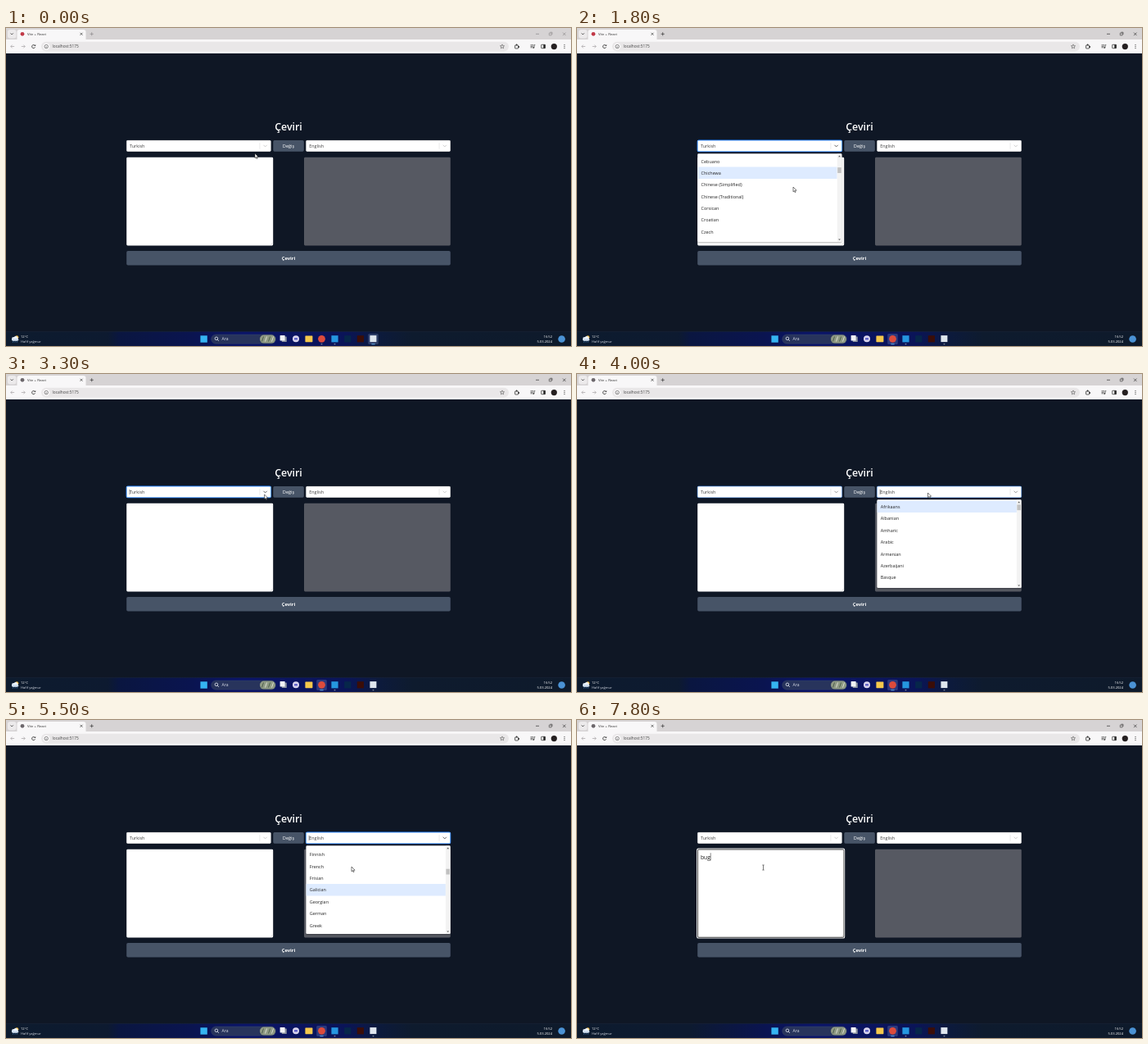
Animation of 690x388 px, one loop 8 s. Source, as an HTML page with a canvas:

```html
<!DOCTYPE html>
<html lang="tr">
<head>
<meta charset="utf-8">
<title>Çeviri</title>
<style>
html, body { margin: 0; width: 100%; height: 100%; overflow: hidden; background: #0f1725; }
canvas { display: block; width: 100vw; height: 100vh; }
</style>
</head>
<body>
<canvas id="stage"></canvas>
<script>
const W = 690, H = 388, LOOP = 8000, STEP = 100;
const FONT = '"Open Sans", "Noto Sans", sans-serif';
const ROW = 14.37, MENU_TOP = 153.3, MENU_H = 107.8, LIST_TOP = MENU_TOP + 1.44;
const LANGS = ('Afrikaans,Albanian,Amharic,Arabic,Armenian,Azerbaijani,Basque,Belarusian,Bengali,' +
  'Bosnian,Bulgarian,Catalan,Cebuano,Chichewa,Chinese (Simplified),Chinese (Traditional),' +
  'Corsican,Croatian,Czech,Danish,Dutch,English,Esperanto,Estonian,Filipino,Finnish,French,' +
  'Frisian,Galician,Georgian,German,Greek,Gujarati,Haitian Creole,Hausa,Hawaiian,Hebrew,Hindi,' +
  'Hmong,Hungarian,Icelandic,Igbo,Indonesian,Irish,Italian,Japanese').split(',');
const LANG_COUNT = 107;

// [time, x, y]
const POINTER = [
  [100, 304, 153], [300, 330, 126], [400, 338, 120], [700, 318, 141], [900, 300, 146],
  [1000, 300, 146], [1300, 270, 188], [1800, 264, 194], [2500, 276, 200], [2600, 282.5, 187],
  [3000, 315, 150], [3500, 316, 145], [3800, 428, 145], [4000, 428.5, 145], [4300, 424, 200],
  [4700, 422, 212], [5400, 422, 205], [5500, 422, 179], [5700, 424, 150], [6000, 420, 146],
  [6500, 227.5, 180]
];
const LEFT = {
  x: 147.2, value: 'Turkish', focus: 1000, blur: 4000, open: 1000, close: 3200,
  scroll: [[1300, 0], [1700, 155], [1800, 172], [2400, 503]]
};
const RIGHT = {
  x: 366.4, value: 'English', focus: 4000, blur: 6700, open: 4000, close: 6000,
  scroll: [[4250, 0], [4600, 252], [4700, 265], [5300, 357]]
};
const SELECT_W = 176.3;

const canvas = document.getElementById('stage');
const c = canvas.getContext('2d');

const clamp = v => Math.max(0, Math.min(1, v));

function track(keys, t, n = 1) {
  if (t <= keys[0][0]) return keys[0][n];
  for (let i = 1; i < keys.length; i++) {
    const a = keys[i - 1], b = keys[i];
    if (t <= b[0]) return a[n] + (b[n] - a[n]) * (t - a[0]) / (b[0] - a[0]);
  }
  return keys[keys.length - 1][n];
}

function mix(a, b, k) {
  return `rgb(${a.map((v, i) => Math.round(v + (b[i] - v) * k))})`;
}

function rect(x, y, w, h, fill, r = 0) {
  c.fillStyle = fill;
  c.beginPath();
  c.roundRect(x, y, w, h, r);
  c.fill();
}

function frame(x, y, w, h, stroke, lw, r = 0) {
  c.strokeStyle = stroke;
  c.lineWidth = lw;
  c.beginPath();
  c.roundRect(x, y, w, h, r);
  c.stroke();
}

function disc(x, y, r, fill) {
  c.fillStyle = fill;
  c.beginPath();
  c.arc(x, y, r, 0, 7);
  c.fill();
}

function line(stroke, lw, ...p) {
  c.strokeStyle = stroke;
  c.lineWidth = lw;
  c.beginPath();
  for (let i = 0; i < p.length; i += 2) c.lineTo(p[i], p[i + 1]);
  c.stroke();
}

function poly(fill, ...p) {
  c.fillStyle = fill;
  c.beginPath();
  for (let i = 0; i < p.length; i += 2) c.lineTo(p[i], p[i + 1]);
  c.closePath();
  c.fill();
}

function text(s, x, y, size, fill, align = 'left', weight = 400) {
  c.font = `${weight} ${size}px ${FONT}`;
  c.textAlign = align;
  c.fillStyle = fill;
  c.fillText(s, x, y);
}

function star(x, y, r) {
  const p = [];
  for (let i = 0; i <= 10; i++) {
    const a = i * Math.PI / 5 - Math.PI / 2, d = i % 2 ? r * 0.45 : r;
    p.push(x + d * Math.cos(a), y + d * Math.sin(a));
  }
  line('#555', 0.6, ...p);
}

function drawTabs(t) {
  const ink = t >= 900 ? '#333' : '#8a8788';
  rect(0, 0, W, 16, '#d6d3d4');
  rect(2, 2, 10.5, 10.5, '#eceaeb', 3);
  line('#333', 0.8, 5.6, 6.4, 7.2, 8, 8.8, 6.4);
  rect(13.5, 2, 84, 14, '#f8f7f8', [3, 3, 0, 0]);
  disc(20, 7.3, 2.4, t < 2700 ? '#c23a48' : '#6d686c');
  text('Vite + React', 26, 9.1, 4.25, '#333');
  line('#333', 0.7, 90.5, 5.8, 93.5, 8.8);
  line('#333', 0.7, 93.5, 5.8, 90.5, 8.8);
  line(ink, 0.7, 102.6, 7.3, 106.8, 7.3);
  line(ink, 0.7, 104.7, 5.2, 104.7, 9.4);
  line(ink, 0.7, 647, 7.3, 651, 7.3);
  frame(663.3, 6.1, 2.8, 2.8, ink, 0.6);
  line(ink, 0.6, 664.4, 5.2, 667, 5.2, 667, 7.9);
  line(ink, 0.7, 680, 5.6, 683.5, 9.1);
  line(ink, 0.7, 683.5, 5.6, 680, 9.1);
}

function drawToolbar() {
  rect(0, 14, W, 17, '#f8f7f8');
  for (const [x, d] of [[8, -1], [21, 1]]) {
    line('#a5a3a4', 0.7, x - 2.2, 22.5, x + 2.2, 22.5);
    line('#a5a3a4', 0.7, x + d * 0.4, 20.6, x + d * 2.2, 22.5, x + d * 0.4, 24.4);
  }
  c.strokeStyle = '#333';
  c.lineWidth = 0.8;
  c.beginPath();
  c.arc(33.6, 22.6, 2, 0.3, 5.5);
  c.stroke();
  poly('#333', 34.2, 22, 36.2, 22, 36.2, 20);

  rect(43, 16.8, 571, 11.6, '#e9e7e8', 5.8);
  disc(49.2, 22.6, 4.2, '#f8f7f8');
  c.strokeStyle = '#444';
  c.lineWidth = 0.6;
  c.beginPath();
  c.arc(49.2, 22.6, 2.2, 0, 7);
  c.stroke();
  line('#444', 0.6, 49.2, 22.3, 49.2, 23.9);
  text('localhost:5175', 56.6, 24.3, 4.75, '#444');
  star(606, 22.6, 2.7);

  frame(621.6, 21, 4, 4, '#333', 0.8, 0.4);
  disc(623.6, 20.4, 0.9, '#333');
  disc(626.2, 23, 0.9, '#333');
  for (let i = 0; i < 3; i++) line('#333', 0.7, 640.5, 20.8 + i * 1.5, 644.3 - i * 0.7, 20.8 + i * 1.5);
  line('#333', 0.7, 645, 23.7, 645, 20.7, 646.3, 20.7);
  disc(644.3, 23.9, 0.9, '#333');
  frame(653.7, 20.3, 4.8, 4.4, '#222', 0.7, 0.4);
  rect(656.3, 20.3, 2.2, 4.4, '#222');
  disc(669.3, 22.6, 3.6, '#241f20');
  for (const y of [20.6, 22.6, 24.6]) disc(682, y, 0.6, '#333');
}

function cloud(x, y) {
  disc(x + 2.2, y - 2, 2.1, '#f0b73a');
  disc(x - 1.8, y, 2.2, '#dfe9f5');
  disc(x + 1, y - 0.6, 2.6, '#eef4fb');
  rect(x - 4, y - 0.4, 8.2, 2.8, '#cfdff2', 1.4);
  for (const d of [-2, 0.4, 2.8]) line('#4f9de8', 0.6, x + d, y + 3, x + d - 0.6, y + 4.4);
}

function drawTaskbar(t) {
  const g = c.createLinearGradient(0, 0, W, 0);
  const left = t < 5800 ? '#0a1640' : '#0d1a30';
  for (const [p, col] of [[0, '#0d1b2e'], [0.18, '#0d1a30'], [0.2, left], [0.33, '#0a1450'],
    [0.42, '#0a1468'], [0.6, '#0a1458'], [0.66, '#0c1a3c'], [0.72, '#0e1b2e'], [1, '#0e1a2b']]) {
    g.addColorStop(p, col);
  }
  rect(0, 370.6, W, 17.4, g);
  rect(0, 370.4, W, 0.4, '#26324a');

  cloud(11, 379.3);
  text('12°C', 18, 378.3, 4.1, '#fff');
  text('Hafif yağmur', 18, 383.9, 4.1, '#d3d8e2');

  rect(237.4, 375.3, 8.4, 8.4, '#35b4f2');
  rect(250.6, 374, 79, 11.2, '#28345c', 5.6);
  frame(250.6, 374, 79, 11.2, '#3b4770', 0.4, 5.6);
  c.strokeStyle = '#e8ecf5';
  c.lineWidth = 0.8;
  c.beginPath();
  c.arc(256.9, 378.8, 1.8, 0, 7);
  c.stroke();
  line('#e8ecf5', 0.8, 258.2, 380.1, 259.9, 381.9);
  text('Ara', 263.6, 381.4, 5, '#dde2ec');
  rect(310, 374.6, 19, 10, '#8f9a84', 5);
  for (let i = 0; i < 4; i++) {
    line(i % 2 ? '#d9dccf' : '#4e5e4c', 1, 312.5 + i * 4, 382.5, 314.5 + i * 4, 376.5);
  }

  const lit = t < 500 ? 448.5 : t >= 900 ? 385.5 : 0;
  if (lit) rect(lit - 6.3, 373, 12.6, 13, 'rgba(150,175,225,.24)', 1.5);
  rect(336.8, 376.6, 6, 6.4, '#8a919e', 0.5);
  rect(334.6, 375, 6, 6.4, '#f2f3f5', 0.5);
  disc(354, 379.2, 4, '#d9d5ee');
  rect(352, 378, 4, 2.4, '#6264c8', 0.5);
  rect(365.4, 375.4, 9, 7.8, '#f5c84c', 0.6);
  disc(385.5, 379.3, 4.4, '#dc4b3c');
  rect(397.4, 375.2, 8.2, 8.2, '#2596e0');
  rect(413.2, 375.2, 8.2, 8.2, '#06264a');
  rect(428.8, 375.2, 8.2, 8.2, '#3a0d08');
  rect(444.4, 375.1, 8, 8, '#dfe6ee');
  for (const x of [385.5, 401.5, 448.5]) {
    const w = x === lit ? 4.6 : 2;
    rect(x - w / 2, 385.3, w, 0.9, x === lit ? '#69b5f5' : '#a7adb8', 0.4);
  }

  text('16:52', 667, 378.3, 4.1, '#fff', 'right');
  text('5.03.2024', 667, 383.9, 4.1, '#fff', 'right');
  disc(678.6, 379.5, 4.3, '#4b92d4');
}

function focusLevel(s, t) {
  return clamp((t - s.focus + 50) / 100) * (1 - clamp((t - s.blur + 50) / 100));
}

function drawSelect(s, t) {
  const f = focusLevel(s, t), y = 137.1, h = 13.6;
  const right = s.x + SELECT_W, border = mix([204, 204, 204], [38, 132, 255], f);
  if (f > 0) frame(s.x, y, SELECT_W, h, `rgba(38,132,255,${f})`, 1.1, 1.5);
  rect(s.x, y, SELECT_W, h, '#fff', 1.4);
  frame(s.x + 0.2, y + 0.2, SELECT_W - 0.4, h - 0.4, border, 0.5, 1.3);
  text(s.value, s.x + 3.9, 145.8, 5.4, '#3c3c3c');
  const ink = mix([204, 204, 204], [96, 96, 96], f);
  line('#ccc', 0.4, right - 13.6, 140.1, right - 13.6, 147.8);
  line(ink, 1, right - 9, 142.8, right - 6.9, 144.9, right - 4.8, 142.8);
  if (t >= s.focus && t < s.blur && (t - s.focus) % 1060 < 530) {
    line('#222', 0.5, s.x + 3.8, 140.8, s.x + 3.8, 147);
  }
}

function hoveredRow(s, t) {
  const y = track(POINTER, t, 2);
  if (t < s.open + 100 || y < LIST_TOP || y > MENU_TOP + MENU_H) return null;
  return Math.floor((y - LIST_TOP + track(s.scroll, t)) / ROW);
}

function focusedRow(s, t) {
  for (let u = t - STEP; u > s.open; u -= STEP) {
    const row = hoveredRow(s, u);
    if (row !== null) return row;
  }
  return 0;
}

function drawMenu(s, t) {
  if (t < s.open || t >= s.close) return;
  const scroll = track(s.scroll, t), focus = focusedRow(s, t);
  const barX = s.x + SELECT_W - 5.8, bottom = MENU_TOP + MENU_H;
  c.save();
  c.shadowColor = 'rgba(0,0,0,.3)';
  c.shadowBlur = 2;
  c.shadowOffsetY = 0.8;
  rect(s.x, MENU_TOP, SELECT_W, MENU_H, '#fff', 1.4);
  c.restore();

  c.save();
  c.beginPath();
  c.rect(s.x, MENU_TOP, SELECT_W, MENU_H);
  c.clip();
  LANGS.forEach((name, i) => {
    const y = LIST_TOP + i * ROW - scroll;
    if (y < MENU_TOP - ROW || y > bottom) return;
    const chosen = name === s.value;
    if (chosen || i === focus) rect(s.x, y, barX - s.x, ROW, chosen ? '#2684ff' : '#deebff');
    text(name, s.x + 4.4, y + ROW / 2 + 2.2, 5.45, chosen ? '#fff' : '#222');
  });
  c.restore();

  const mid = barX + 2.8;
  rect(barX, MENU_TOP + 0.4, 5.4, MENU_H - 0.8, '#f3f3f3');
  poly('#555', mid - 1.4, 157.3, mid + 1.4, 157.3, mid, 155.6);
  poly('#555', mid - 1.4, 257.4, mid + 1.4, 257.4, mid, 259.1);
  rect(barX + 0.5, 159.4 + scroll / (LANG_COUNT * ROW) * 96, 4.5, 6.8, '#c1c1c1');
}

function drawPage(t) {
  rect(0, 31, W, 340, '#0f1725');
  text('Çeviri', 345, 125.2, 12.4, '#fff', 'center', 600);
  drawSelect(LEFT, t);
  drawSelect(RIGHT, t);
  rect(326.3, 137.1, 37.5, 13.6, '#475467', 1.6);
  text('Değiş', 345, 145.9, 5.6, '#fff', 'center');

  const focused = t >= 6700;
  if (focused) frame(146.7, 157.2, 179.9, 108.8, '#fff', 1.2, 1.6);
  rect(147.2, 157.7, 179, 107.8, '#fff', 1.4);
  if (focused) frame(147.5, 158, 178.4, 107.2, '#101010', 0.7, 1.2);
  line('#999', 0.4, 323.2, 264.6, 325.3, 262.5);
  rect(364, 157.7, 178.8, 107.8, '#565962', 1.4);

  const typed = 'bug'.slice(0, [7300, 7600, 7800].filter(k => t >= k).length);
  text(typed, 150.9, 169.6, 6.75, '#1c1c1c');
  if (focused && (t < 7000 || typed)) {
    const x = 151.2 + c.measureText(typed).width;
    line('#111', 0.5, x, 162.2, x, 171.4);
  }

  rect(147.2, 272, 395.6, 17.5, '#475467', 1.8);
  text('Çeviri', 345, 283, 5.8, '#fff', 'center', 700);
  drawMenu(LEFT, t);
  drawMenu(RIGHT, t);
}

function drawPointer(t) {
  const x = track(POINTER, t, 1), y = track(POINTER, t, 2);
  const overText = x > 147 && x < 326 && y > 158 && y < 265.5 && t >= LEFT.close;
  if (overText) {
    line('#222', 0.6, x, y - 2.8, x, y + 2.8);
    line('#222', 0.6, x - 1.2, y - 3, x + 1.2, y - 3);
    line('#222', 0.6, x - 1.2, y + 3, x + 1.2, y + 3);
    return;
  }
  const p = [0, 0, 0, 5.8, 1.35, 4.6, 2.2, 6.6, 3.1, 6.2, 2.3, 4.3, 4.1, 4.2, 0, 0]
    .map((v, i) => v + (i % 2 ? y : x));
  poly('#fff', ...p);
  line('#111', 0.55, ...p);
}

function draw() {
  const dpr = window.devicePixelRatio || 1;
  const w = Math.round(innerWidth * dpr), h = Math.round(innerHeight * dpr);
  if (canvas.width !== w || canvas.height !== h) {
    canvas.width = w;
    canvas.height = h;
  }
  c.setTransform(w / W, 0, 0, h / H, 0, 0);
  const t = Math.floor(performance.now() % LOOP / STEP) * STEP;
  drawPage(t);
  drawTabs(t);
  drawToolbar();
  drawTaskbar(t);
  drawPointer(t);
  requestAnimationFrame(draw);
}
draw();
</script>
</body>
</html>
```
